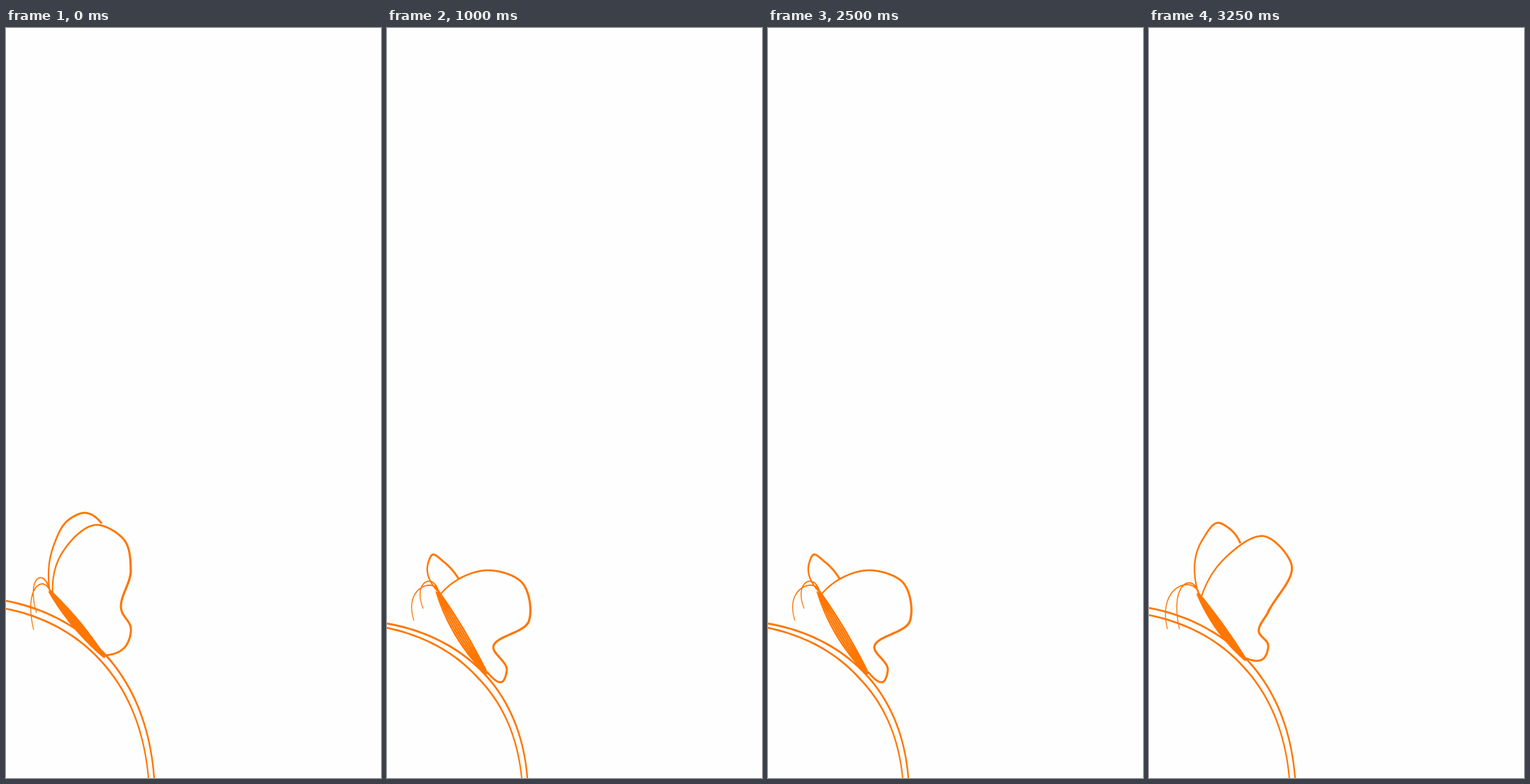
Animation, 529 px wide and 1058 px high, one loop 3.5 s. Source, as an HTML page:

```html
<!DOCTYPE html>
<html lang="en">
<head>
<meta charset="utf-8">
<title>Butterfly</title>
<style>
  html, body { margin: 0; width: 100%; height: 100%; overflow: hidden; background: #fefefe; }
  svg { display: block; width: 100%; height: 100%; }
</style>
</head>
<body>
<svg viewBox="0 0 529 1058"><path id="ink" fill="#ff7600"/></svg>
<script>
const STEP = 250, FLOOR = 1058;

const points = s => s.split(' ').map(p => p.split(',').map(Number));

// stem: y at the left edge, x at the floor, gap between its two lines
// body: head and tail; bow: how far its outermost strands curve to each side
// feelers: tip x, tip y, height of the arch
const pose = (stem, body, bow, feelers, back, front) =>
  ({ stem, bow, body: points(body), feelers: points(feelers), back: points(back), front: points(front) });

const upright = pose([808, 209, 11], '60,792 139,887', [-6, 4], '43,825,774 39,849,786',
  '68,728 88,694 112,684 135,699',
  '75,748 130,701 168,724 176,765 163,822 176,846 168,873');
const leaning = pose([818, 206, 10], '68,795 137,891', [-8, 2], '43,848,782 26,848,786',
  '76,721 98,698 112,705 129,727',
  '106,749 163,717 201,757 168,824 155,852 168,870 161,890');
const half = pose([836, 196, 8], '66,798 136,905', [-7, 3], '43,844,787 31,858,794',
  '64,758 70,742 86,745 105,762',
  '103,763 153,746 192,775 187,828 148,858 168,884 160,902');
const wide = pose([840, 198, 6], '70,791 141,910', [-10, 3], '51,819,782 38,836,790',
  '58,755 64,743 80,753 101,777',
  '100,778 142,765 191,783 200,837 150,874 169,906 163,922');
const flat = pose([838, 202, 11], '69,780 160,926', [-8, 7], '45,831,780 36,831,782',
  '60,763 64,758 71,766 80,782',
  '92,775 123,801 142,841 151,887 165,904 180,926 174,937');

const lerp = (a, b, t) => a + (b - a) * t;

// Values of t outside 0..1 carry the movement on past a pose
function mix(a, b, t) {
  if (typeof a === 'number') return lerp(a, b, t);
  if (Array.isArray(a)) return a.map((v, i) => mix(v, b[i], t));
  return Object.fromEntries(Object.keys(a).map(k => [k, mix(a[k], b[k], t)]));
}

const range = n => Array.from({ length: n }, (_, i) => i);

const bezier = (a, b, c, d) => range(41).map(i => {
  const t = i / 40, s = 1 - t;
  return [0, 1].map(k => s * s * s * a[k] + 3 * s * s * t * b[k] + 3 * s * t * t * c[k] + t * t * t * d[k]);
});

// Smooth curve through key points, with tangents weighted by distance
function smooth(pts) {
  const n = pts.length - 1;
  const h = range(n).map(i => Math.hypot(pts[i + 1][0] - pts[i][0], pts[i + 1][1] - pts[i][1]));
  const slope = h.map((len, i) => [0, 1].map(k => (pts[i + 1][k] - pts[i][k]) / len));
  const m = [];
  for (let i = 1; i < n; i++) m[i] = mix(slope[i - 1], slope[i], h[i - 1] / (h[i - 1] + h[i]));
  m[0] = mix(m[1], slope[0], 2);
  m[n] = mix(m[n - 1], slope[n - 1], 2);
  return h.flatMap((len, i) => {
    const handle = (p, v, s) => p.map((c, k) => c + v[k] * s * len / 3);
    const part = bezier(pts[i], handle(pts[i], m[i], 1), handle(pts[i + 1], m[i + 1], -1), pts[i + 1]);
    return i ? part.slice(1) : part;
  });
}

// Value at u = 0..1 on a ramp from a over b to c
const ramp = ([a, b, c], u) => u < 0.5 ? lerp(a, b, 2 * u) : lerp(b, c, 2 * u - 1);

// Shifts a line sideways by a changing distance
function offset(line, dist) {
  const n = line.length - 1;
  return line.map(([x, y], i) => {
    const a = line[Math.max(i - 1, 0)], b = line[Math.min(i + 1, n)];
    const dx = b[0] - a[0], dy = b[1] - a[1];
    const r = ramp(dist, i / n) / (Math.hypot(dx, dy) || 1);
    return [x - dy * r, y + dx * r];
  });
}

// Outline of a pen stroke; widths at the start, middle and end
function brush(line, widths) {
  const side = s => offset(line, widths.map(w => w * s / 2));
  const edge = [...side(1), ...side(-1).reverse()];
  return 'M' + edge.map(p => p.map(v => v.toFixed(2)).join(' ')).join('L') + 'Z';
}

function stem([top, right, gap]) {
  const at = (u, v) => [u * right, lerp(top, FLOOR, v)];
  const outer = bezier(at(0, 0), at(0.55, 0.09), at(0.95, 0.43), at(1, 1));
  return brush(outer, [2.7, 2.7, 2.3]) + brush(offset(outer, [gap, 10.5, 8]), [2.6, 2.6, 2]);
}

// A bundle of scribbled strands from head to tail
function body([head, tail], [left, right]) {
  const dx = tail[0] - head[0], dy = tail[1] - head[1], len = Math.hypot(dx, dy);
  return range(6).map(i => {
    const bend = lerp(left, right, i / 5) * 4 / 3, slip = Math.sin(i * 7) * 0.02;
    const on = (t, b) => [head[0] + dx * t + dy / len * b, head[1] + dy * t - dx / len * b];
    return brush(bezier(on(0.02 + slip, bend / 5), on(0.33, bend), on(0.67, bend), on(0.99 + slip, bend / 5)),
      [1.7, 2.5, 2]);
  }).join('');
}

const feeler = (head, [x, y, top]) =>
  brush(bezier(head, [head[0] - 8, top - 14], [x - 15, top], [x, y]), [2, 1.7, 1.2]);

function draw(p) {
  const [head, tail] = p.body;
  const near = (x, y) => [head[0] + x, head[1] + y];
  return stem(p.stem) + body(p.body, p.bow) +
    p.feelers.map(f => feeler(near(2, 2), f)).join('') +
    brush(smooth([near(2, 4), ...p.back]), [2, 2.8, 2.8]) +
    brush(smooth([near(6, 7), ...p.front, [tail[0], tail[1] - 2]]), [2, 3.2, 2.7]);
}

const drawings = [
  upright, mix(upright, leaning, -0.2), leaning, half,
  wide, mix(half, wide, 1.6), flat, mix(wide, flat, 1.25)
].map(draw);
const order = [0, 1, 2, 3, 4, 5, 6, 7, 6, 5, 4, 3, 1, 2];
const ink = document.getElementById('ink');
const start = performance.now();
let shown = -1;

function render(now) {
  const i = order[Math.floor(Math.max(now - start, 0) / STEP) % order.length];
  if (i !== shown) ink.setAttribute('d', drawings[shown = i]);
  requestAnimationFrame(render);
}
render(start);
</script>
</body>
</html>
```
